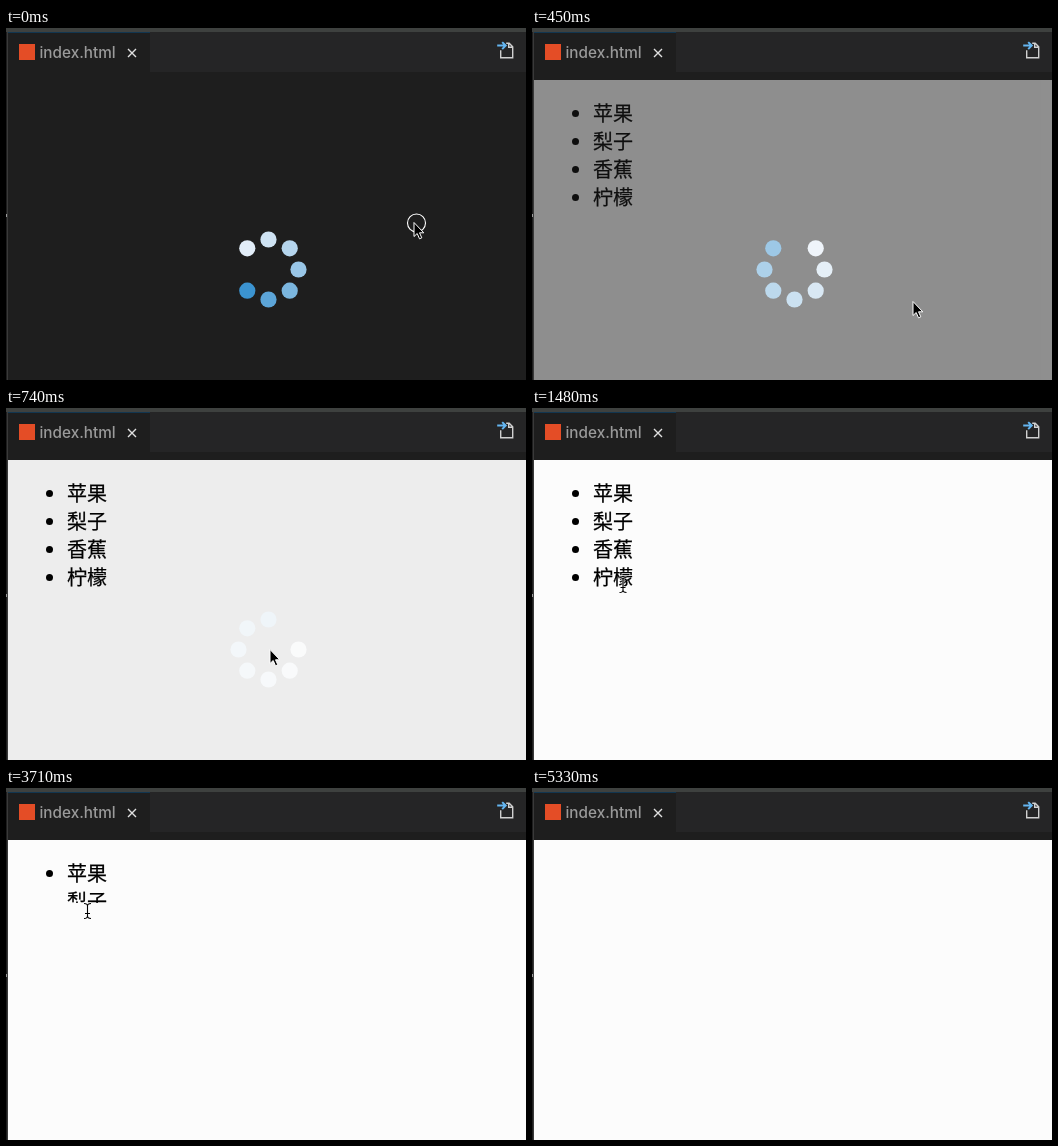
Write an HTML page that moves like this. It is 520x352 px and loops after 6.09 s.

```html
<!DOCTYPE html>
<html lang="zh-CN">
<head>
<meta charset="utf-8">
<title>index.html</title>
<style>
html, body { margin: 0; width: 100%; height: 100%; overflow: hidden; background: #1e1e1e; }
#stage { position: relative; width: 520px; height: 352px; overflow: hidden; }
svg { position: absolute; left: 0; top: 0; }
#page { position: absolute; left: 2px; top: 52px; width: 518px; height: 300px; background: #fcfcfc; }
ul { position: absolute; left: 59px; top: 19px; margin: 0; padding: 0; list-style: none;
  font: 20px/28px "Noto Sans CJK SC", "Noto Sans CJK", sans-serif; color: #000;
  -webkit-text-stroke: .25px #000; }
li { position: relative; height: 28px; white-space: nowrap; }
li::before { content: ""; position: absolute; left: -21.5px; top: 11px; width: 7px; height: 7px;
  border-radius: 50%; background: #000; }
</style>
</head>
<body>
<div id="stage">
  <div id="page"><ul><li>苹果</li><li>梨子</li><li>香蕉</li><li>柠檬</li></ul></div>
  <svg width="520" height="352" fill="none">
    <g id="overlay"><path d="M2 52H520V352H2Z" fill="#1e1e1e"/></g>

    <path d="M0 0H520V52H0Z" fill="#1e1e1e"/>
    <path d="M0 0H520V4H0Z" fill="#3e413f"/>
    <path d="M144 4H520V44H144Z" fill="#252526"/>
    <path d="M2 4.5H144" stroke="#123650"/>
    <path d="M0 4H1V352H0Z" fill="#1e1e1e"/>
    <path d="M1 4H2V352H1Z" fill="#3a3a3a"/>
    <path d="M0 186H1V189H0Z" fill="#999"/>

    <path d="M13 16H29V32H13Z" fill="#e44d26"/>
    <text x="33.5" y="30.3" fill="#9a9a9a" font-family="Inter, sans-serif" font-size="15.3" font-weight="500">index.html</text>
    <path d="M122 21L130 29M130 21L122 29" stroke="#e0e0e0" stroke-width="1.4"/>
    <g transform="translate(-.8 -.7)">
      <path d="M495.5 23V30.5H507.5V19.5L504 16H501M503.5 16V20H507.5" stroke="#d0d0d0" stroke-width="1.4"/>
      <path d="M492 18.3H500M497 14.8L500.5 18.3L497 21.8" stroke="#64b5f0" stroke-width="2"/>
    </g>

    <g id="arrow">
      <circle id="ring" cx="2.5" cy="1" r="9" stroke="#fff" stroke-width="1.1"/>
      <path d="M0 .5V14.5L3.2 11.5L5.5 16.8L7.8 15.8L5.5 10.8H9.8Z" fill="#000" stroke="#fff"/>
    </g>
    <g id="beam">
      <path id="bar" d="M-3.5 -7.5Q0 -7.5 0 -5Q0 -7.5 3.5 -7.5M0 -5V5M-3.5 7.5Q0 7.5 0 5Q0 7.5 3.5 7.5M-2.5 2.5H2.5"/>
      <use href="#bar" stroke="#fff" stroke-width="2.4" stroke-opacity=".7"/>
      <use href="#bar" stroke="#000" stroke-width="1.1"/>
    </g>
  </svg>
</div>
<script>
const LOOP = 6090, TICK = 148.1, SLIDE = 400;
const $ = id => document.getElementById(id);
const rows = [...document.querySelectorAll("li")];

// Where the pointer rests on each row, and the ticks of arrival and click
const visits = [
  { reach: 27, click: 30, x: 75, y: 93 },
  { reach: 22, click: 24, x: 81.5, y: 123 },
  { reach: 16, click: 18, x: 90, y: 148.5 },
  { reach: 10, click: 14, x: 91, y: 177 }
];

// Pointer waypoints as [tick, x, y], joined by straight moves
const route = [
  [0, 408, 194], [2, 397.5, 249], [3, 381, 273], [5, 264, 241], [7, 164, 212], [8, 70, 93],
  ...[...visits].reverse().flatMap(v => [[v.reach, v.x, v.y], [v.click + 1, v.x, v.y]]),
  [32, 193, 128], [33, 392, 283], [35, 411, 336], [36, 600, 400]
];

const clamp = x => Math.min(1, Math.max(0, x));
const lerp = (a, b, u) => a + (b - a) * u;
const swing = x => 0.5 - Math.cos(Math.PI * clamp(x)) / 2;

// cubic-bezier(.25, .1, .25, 1)
function ease(x) {
  x = clamp(x);
  const curve = (a, b, u) => 3 * a * u * (1 - u) ** 2 + 3 * b * u * u * (1 - u) + u ** 3;
  let lo = 0, hi = 1;
  for (let i = 0; i < 25; i++) {
    const mid = (lo + hi) / 2;
    if (curve(0.25, 0.25, mid) < x) lo = mid; else hi = mid;
  }
  return curve(0.1, 1, lo);
}

const dots = Array.from({ length: 8 }, (_, i) => {
  const dot = document.createElementNS("http://www.w3.org/2000/svg", "circle");
  const a = Math.PI * (1 + i / 4);
  dot.setAttribute("cx", 262.5 + 30 * Math.cos(a));
  dot.setAttribute("cy", 241.5 + 30 * Math.sin(a));
  dot.setAttribute("r", 8.1);
  return $("overlay").appendChild(dot);
});

// The gap steps clockwise; dots darken from pale to blue behind it
function drawSpinner(t) {
  const step = Math.floor((t + 10) / 225) % 8;
  $("overlay").setAttribute("opacity", 1 - ease((t - 220) / 750));
  dots.forEach((dot, i) => {
    const k = (i - step + 8) % 8, u = (Math.max(0, k - 1) / 6) ** 1.2;
    dot.setAttribute("fill", k
      ? `rgb(${lerp(226, 59, u)}, ${lerp(237, 147, u)}, ${lerp(248, 208, u)})`
      : "none");
  });
}

function drawList(t) {
  rows.forEach((row, i) => {
    const age = t - visits[i].click * TICK + 33;
    row.style.height = 28 * (1 - swing(age / SLIDE)) + "px";
    row.style.overflow = age > 0 ? "hidden" : "visible";
  });
}

function drawPointer(n) {
  const next = Math.max(1, route.findIndex(([tick]) => tick >= n));
  const [a, ax, ay] = route[n > 36 ? route.length - 1 : next - 1];
  const [b, bx, by] = route[n > 36 ? route.length - 1 : next];
  const u = b > a ? (n - a) / (b - a) : 0;
  const shape = n >= 8 && n < 32 ? "beam" : "arrow";
  for (const id of ["arrow", "beam"]) $(id).style.display = id === shape ? "" : "none";
  $(shape).setAttribute("transform", `translate(${lerp(ax, bx, u)} ${lerp(ay, by, u)})`);
  $("ring").style.display = n === 0 ? "" : "none";
}

function draw(now) {
  const n = Math.floor((now % LOOP + 5) / TICK);
  drawSpinner(n * TICK);
  drawList(n * TICK);
  drawPointer(Math.min(n, 36));
  requestAnimationFrame(draw);
}
draw(0);
</script>
</body>
</html>
```
